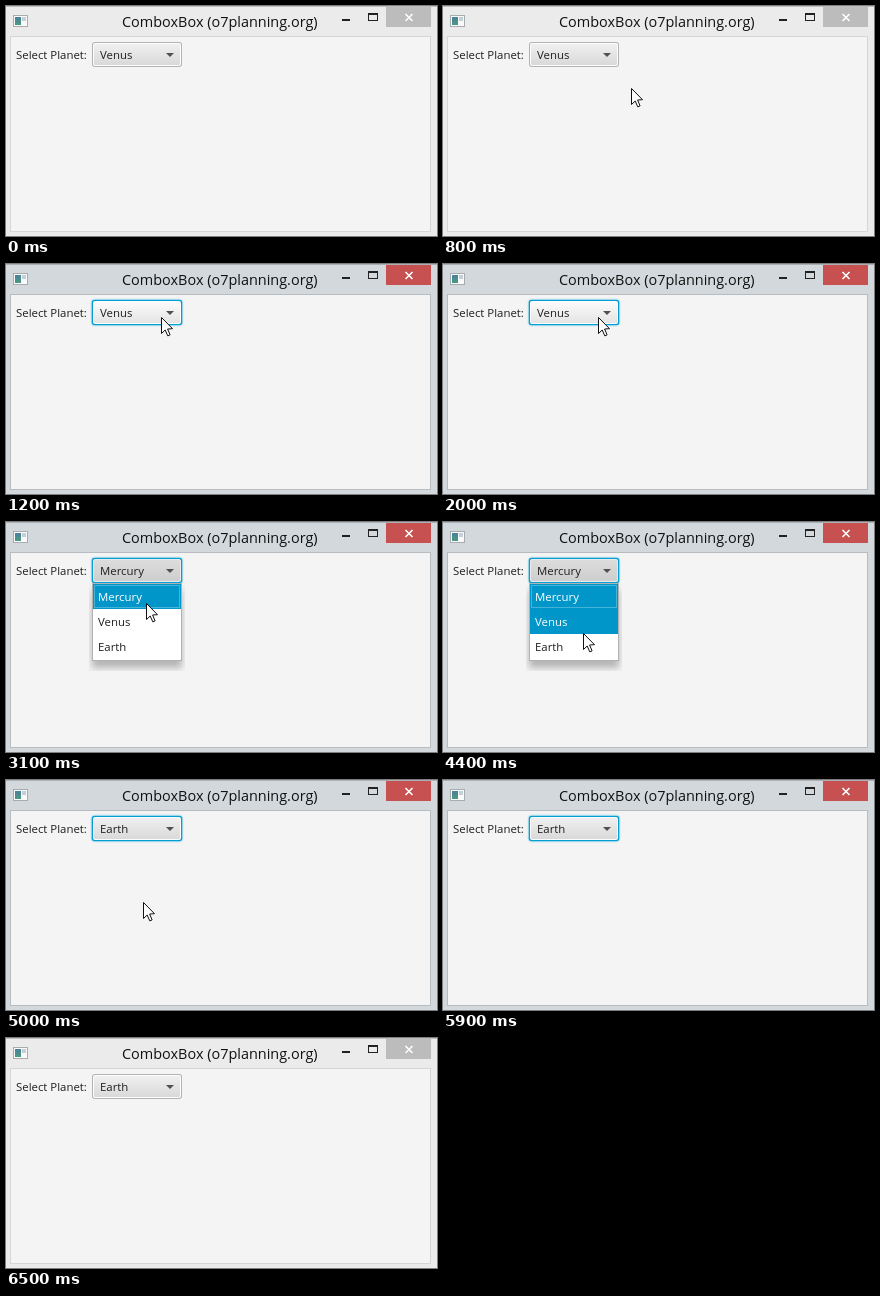
An HTML page with a canvas for the animation above (6700 ms loop, 431 by 230 pixels).

```html
<!DOCTYPE html>
<html lang="en">
<head>
<meta charset="utf-8">
<title>ComboxBox</title>
<style>
html, body { margin: 0; width: 100%; height: 100%; overflow: hidden; background: #ebebeb; }
canvas { display: block; }
</style>
</head>
<body>
<canvas id="stage" width="431" height="230"></canvas>
<script>
const ctx = document.getElementById('stage').getContext('2d', { alpha: false });
const LOOP = 6700, STEP = 100, ROW = 25;
const planets = ['Mercury', 'Venus', 'Earth'];
const box = { x: 86, y: 36, w: 90, h: 25 };

// Each leg of the pointer runs evenly along a Bezier curve, then rests
const onCombo = [155, 53], onMercury = [140, 81], onEarth = [137, 122];
const legs = [
  { start: 300, end: 900, curve: [[428, 50], [330, 115], [210, 125], onCombo] },
  { start: 2500, end: 2800, curve: [onCombo, onMercury] },
  { start: 3200, end: 3600, curve: [onMercury, onCombo] },
  { start: 3900, end: 4500, curve: [onCombo, onEarth] },
  { start: 5300, end: 5800, curve: [onEarth, [240, 100], [340, 110], [424, 27]] }
];

function bezier(points, k) {
  if (points.length === 1) return points[0];
  const next = points.slice(1).map(([x, y], i) => {
    const [px, py] = points[i];
    return [px + (x - px) * k, py + (y - py) * k];
  });
  return bezier(next, k);
}

function pointerAt(t) {
  if (t < 300 || t >= 5900) return null;
  const leg = legs.filter(l => l.start <= t).pop();
  const k = Math.min(1, (t - leg.start) / (leg.end - leg.start));
  const [x, y] = bezier(leg.curve, k).map(Math.round);
  return { x, y };
}

function rect(x, y, w, h, color) {
  ctx.fillStyle = color;
  ctx.fillRect(x, y, w, h);
}

function frame(x, y, w, h, color) {
  ctx.strokeStyle = color;
  ctx.lineWidth = 1;
  ctx.strokeRect(x + 0.5, y + 0.5, w - 1, h - 1);
}

// Rounded layer of the combo box, shrunk by an inset
function layer(inset, radius, fill) {
  ctx.beginPath();
  ctx.roundRect(box.x + inset, box.y + inset, box.w - 2 * inset, box.h - 2 * inset, radius);
  ctx.fillStyle = fill;
  ctx.fill();
}

function poly(points, fill) {
  ctx.beginPath();
  points.forEach(([x, y]) => ctx.lineTo(x, y));
  ctx.closePath();
  ctx.fillStyle = fill;
  ctx.fill();
}

function text(str, x, y, size = 11.4, color = '#1e1e1e') {
  ctx.font = size + 'px "Open Sans", "Noto Sans", sans-serif';
  ctx.fillStyle = color;
  ctx.fillText(str, x, y);
}

function shade(y0, y1, top, bottom) {
  const g = ctx.createLinearGradient(0, y0, 0, y1);
  g.addColorStop(0, top);
  g.addColorStop(1, bottom);
  return g;
}

function drawWindow(active) {
  rect(0, 0, 431, 230, active ? '#d2d8dc' : '#ebebeb');
  rect(0, 0, 431, 1, active ? '#a9afb3' : '#bdbdbd');
  rect(4, 30, 421, 196, active ? '#b6bcc0' : '#d6d6d6');
  rect(5, 31, 419, 194, '#f4f4f4');

  // Application icon
  rect(7, 9, 15, 12, '#a6adb0');
  rect(8, 10, 13, 10, '#fafafa');
  rect(9, 11, 6, 8, shade(11, 19, '#4b7f9c', '#4b9a80'));
  rect(16, 11, 4, 4, '#c3d0d8');

  text('ComboxBox (o7planning.org)', 116, 21, 14.45, '#111');

  // Window controls
  rect(336, 13, 8, 2, '#222');
  frame(362, 7, 10, 8, '#222');
  rect(362, 7, 10, 2, '#222');
  rect(380, 1, 45, 20, active ? '#c75050' : '#bcbcbc');
  ctx.strokeStyle = '#fff';
  ctx.lineWidth = 1.6;
  ctx.beginPath();
  ctx.moveTo(399.5, 8); ctx.lineTo(406.5, 15);
  ctx.moveTo(406.5, 8); ctx.lineTo(399.5, 15);
  ctx.stroke();
}

function drawCombo(value, focused, hover, open) {
  const fill = open ? ['#dcdcdc', '#cecece'] : hover ? ['#fbfbfb', '#e4e4e4'] : ['#f0f0f0', '#d9d9d9'];
  if (focused) layer(-1.4, 4, 'rgba(3,158,211,.14)');
  layer(focused ? -0.3 : 0, 3, focused ? '#039ed3' : '#b4b4b4');
  layer(1, 2, open ? '#ebebeb' : '#fcfcfc');
  layer(2, 1.5, shade(38, 59, ...fill));
  text(value, 94, 53);
  poly([[160, 47], [168, 47], [164, 51]], '#505050');
}

function drawPopup(value, hoverRow) {
  ctx.save();
  // Keep the shadow off the control above
  ctx.beginPath();
  ctx.rect(83, 61, 96, 88);
  ctx.clip();
  ctx.shadowColor = 'rgba(0,0,0,.26)';
  ctx.shadowBlur = 7;
  ctx.shadowOffsetY = 7;
  rect(86, 61, 90, 78, '#b2b2b2');
  ctx.restore();
  rect(87, 62, 88, 76, '#fff');
  planets.forEach((name, i) => {
    const y = 62 + i * ROW, selected = name === value, lit = selected || i === hoverRow;
    if (lit) rect(87, y, 88, ROW, '#0096c9');
    if (selected) frame(88, y + 1, 86, ROW - 2, '#45b3d8');
    text(name, 92, y + 17, 11.4, lit ? '#fff' : '#1e1e1e');
  });
}

function drawPointer({ x, y }) {
  ctx.save();
  ctx.translate(x + 0.5, y + 0.5);
  poly([[0, 0], [0, 16], [3.7, 12.5], [6.3, 18.4], [8.6, 17.4], [6.1, 11.5], [11, 11.2]], '#fff');
  ctx.strokeStyle = '#111';
  ctx.lineWidth = 1;
  ctx.stroke();
  ctx.restore();
}

function draw(t) {
  const during = (start, end) => t >= start && t < end;
  const active = during(1200, 6500);
  const open = during(1400, 2000) || during(2500, 3200) || during(3900, 5000);
  const value = t < 3100 ? 'Venus' : t < 4900 ? 'Mercury' : 'Earth';
  const p = pointerAt(t);
  const hover = p && p.x >= box.x && p.x < box.x + box.w && p.y >= box.y && p.y < box.y + box.h;

  drawWindow(active);
  text('Select Planet:', 10, 53);
  drawCombo(value, active, hover, open);
  if (open) drawPopup(value, Math.floor((p.y - 62) / ROW));
  if (p) drawPointer(p);
}

function tick(now) {
  draw(Math.floor((now % LOOP) / STEP) * STEP);
  requestAnimationFrame(tick);
}
draw(0);
requestAnimationFrame(tick);
</script>
</body>
</html>
```
